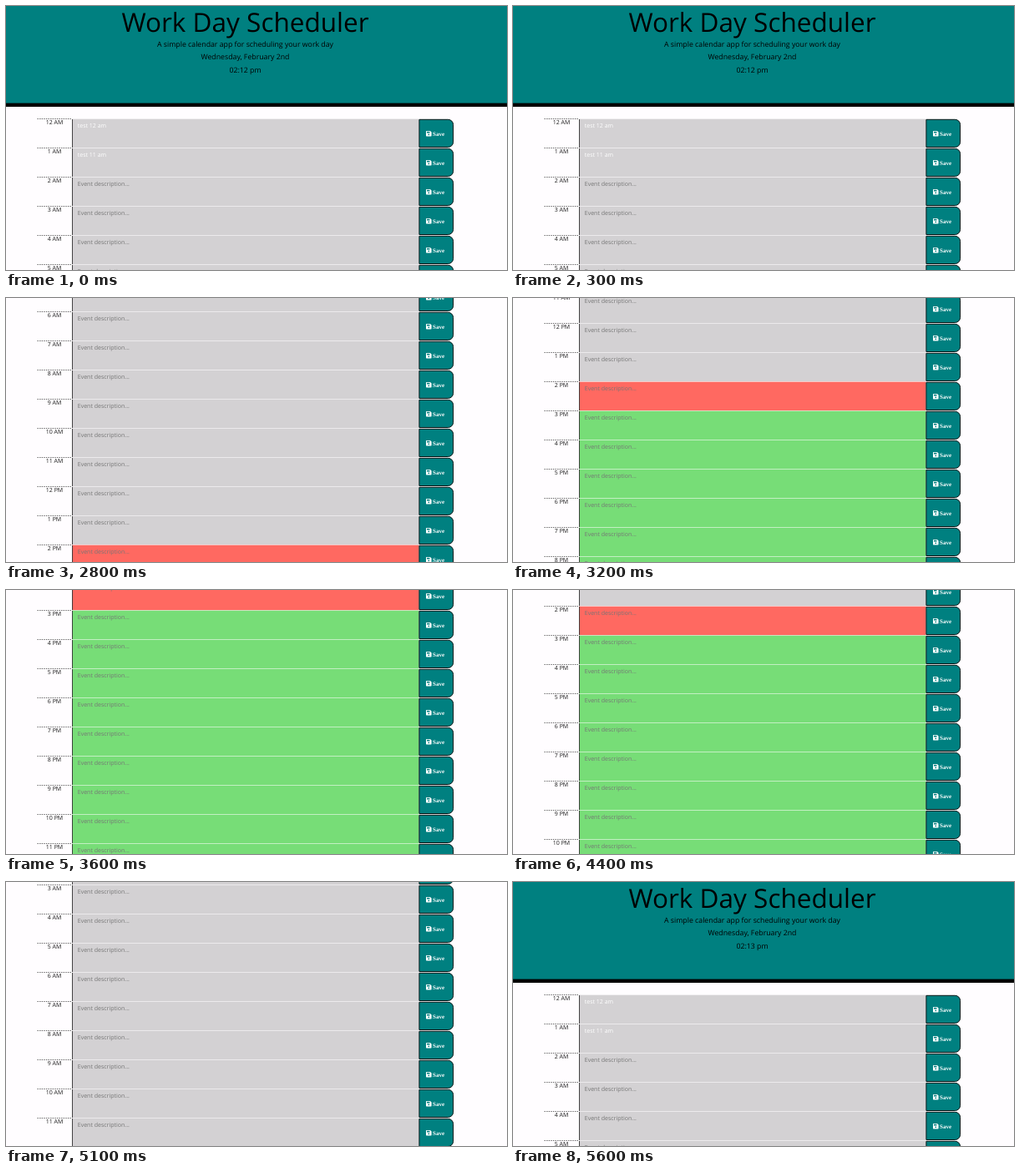
An HTML page that plays this animation: 600 px wide and 317 px high, repeating every 6.2 s.

```html
<!DOCTYPE html>
<html lang="en">
<head>
<meta charset="utf-8">
<title>Work Day Scheduler</title>
<style>
  html, body { margin: 0; width: 100%; height: 100%; overflow: hidden; background: #fffdff; }
  svg { display: block; width: 600px; height: 317px; }
  text { font: 7px "Open Sans", sans-serif; text-rendering: geometricPrecision; white-space: pre; }
  .mid { text-anchor: middle; }
  .title { font-size: 31.5px; }
  .lead { font-size: 8.75px; }
  .hour { fill: #1c1c1c; }
  .dash { stroke: #666; stroke-dasharray: 1.4 1.2; }
  .past { fill: #d3d1d3; }
  .present { fill: #ff6961; }
  .future { fill: #77dd77; }
  .hint { fill: #757575; }
  .note { fill: #fff; }
  .save { font: bold 7px "Liberation Serif", serif; fill: #fff; }
</style>
</head>
<body>
<svg viewBox="0 0 600 317">
  <defs>
    <g id="button">
      <path d="M494.9 1.3H529.4a6.2 6.2 0 0 1 6.2 6.2V28.3a6.2 6.2 0 0 1-6.2 6.2H494.9Z"
            fill="#008080" stroke="#061414"/>
      <path d="M503.6 14.9h4.4l1.6 1.6v4.3q0 .6-.6.6h-5.4q-.6 0-.6-.6v-5.3q0-.6.6-.6Z" fill="#fff"/>
      <path d="M504 15.8h3.5v1.7h-3.5Z" fill="#008080"/>
      <circle cx="506.3" cy="19.3" r=".9" fill="#008080"/>
      <text class="save" x="511" y="20.5">Save</text>
    </g>
  </defs>
  <g id="page">
    <rect width="600" height="117" fill="#008080"/>
    <rect y="116.6" width="600" height="4.4"/>
    <g class="mid">
      <text class="title" x="286.5" y="31">Work Day Scheduler</text>
      <text class="lead" x="286.5" y="48.5">A simple calendar app for scheduling your work day</text>
      <text class="lead" x="286.5" y="64.3">Wednesday, February 2nd</text>
      <text class="lead" x="286.5" y="80" id="clock">02:12 pm</text>
    </g>
    <g id="rows" transform="translate(0 135)"></g>
  </g>
</svg>
<script>
  const LOOP = 6200, STEP = 100, NOW_HOUR = 14, ROW = 35;
  const notes = ["test 12 am", "test 11 am"];
  // [time in ms, scroll offset in px]
  const stops = [
    [0, 0], [2100, 0], [2800, 329], [3200, 525], [3500, 624], [3800, 659],
    [4300, 659], [5100, 237], [5600, 0], [LOOP, 0]
  ];

  const page = document.getElementById("page");
  const clock = document.getElementById("clock");

  function row(hour) {
    const label = `${hour % 12 || 12} ${hour < 12 ? "AM" : "PM"}`;
    const state = hour < NOW_HOUR ? "past" : hour > NOW_HOUR ? "future" : "present";
    const note = notes[hour];
    return `<g transform="translate(0 ${hour * ROW})">
      <path class="dash" d="M37.5 .5H79"/>
      <text class="hour mid" x="58" y="7">${label}</text>
      <rect class="${state}" x="79" y=".65" width="415.5" height="34.5"/>
      <path d="M79.5 1V35" stroke="#333" stroke-width=".9"/>
      <text class="${note ? "note" : "hint"}" x="85.8" y="10.6">${note || "Event description..."}</text>
      <use href="#button"/>
    </g>`;
  }

  function scrollAt(t) {
    const i = stops.findIndex(([time]) => time > t);
    const [t0, y0] = stops[i - 1], [t1, y1] = stops[i];
    return Math.round(y0 + (y1 - y0) * (t - t0) / (t1 - t0));
  }

  function draw(now) {
    // The scroll advances in discrete 100 ms ticks.
    const t = Math.floor((now % LOOP) / STEP) * STEP;
    page.setAttribute("transform", `translate(0 ${-scrollAt(t)})`);
    clock.textContent = t < 2000 ? "02:12 pm" : "02:13 pm";
  }

  document.getElementById("rows").innerHTML = Array.from({ length: 24 }, (_, h) => row(h)).join("");

  const start = performance.now();
  function tick() {
    draw(performance.now() - start);
    requestAnimationFrame(tick);
  }
  tick();
</script>
</body>
</html>
```
